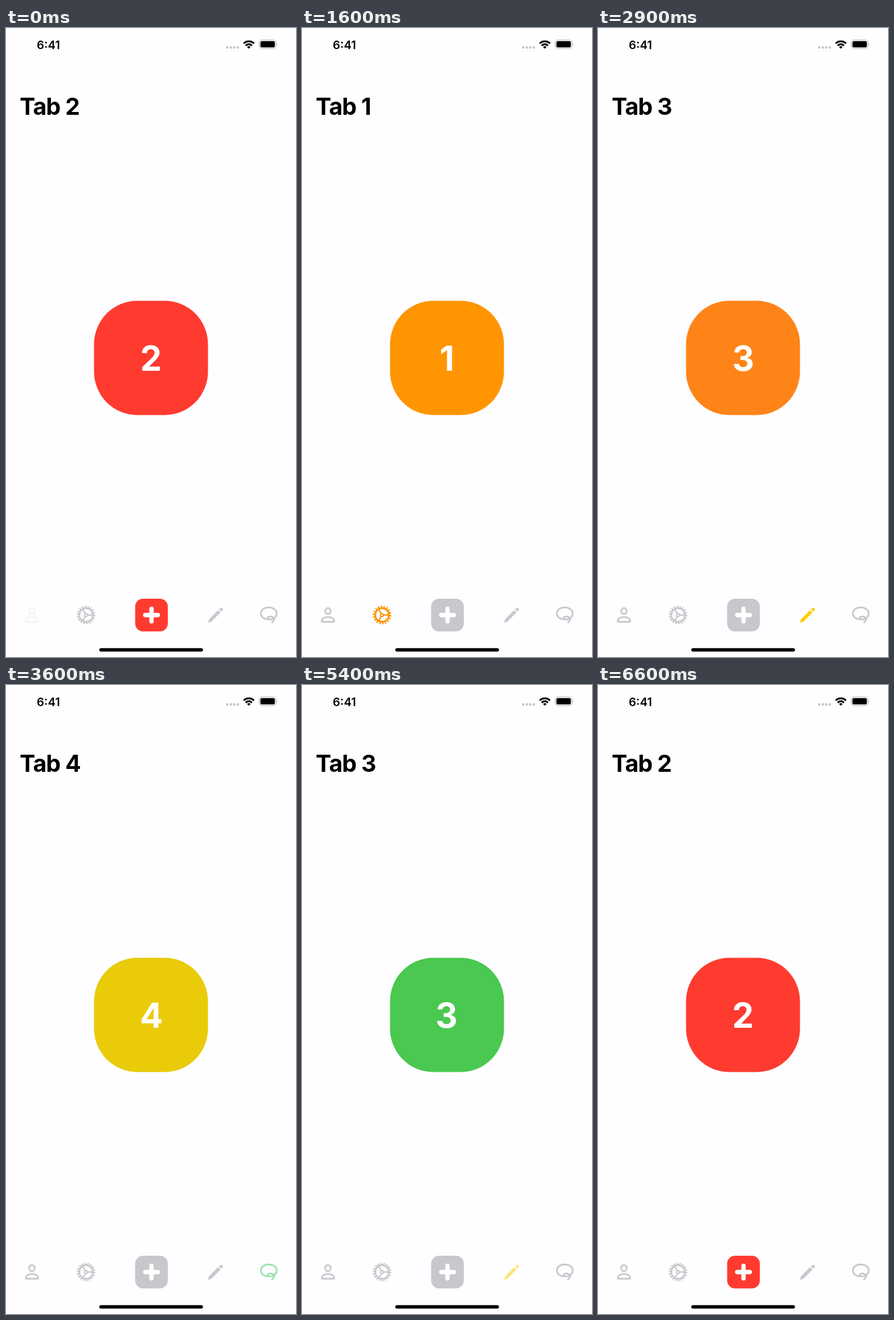
These frames come from a looping animation (509x1101 px, 6700 ms). An HTML page:

```html
<!DOCTYPE html>
<html lang="en">
<head>
<meta charset="utf-8">
<title>Tab bar</title>
<style>
  html, body { margin: 0; width: 100%; height: 100%; overflow: hidden; background: #fefdff; }
  svg { display: block; width: 100%; height: 100%; }
  text { font-family: Inter, sans-serif; }
  .line { fill: none; stroke: currentColor; stroke-width: 3; stroke-linecap: round; stroke-linejoin: round; }
  .tab { fill: currentColor; }
</style>
</head>
<body>
<svg viewBox="0 0 509 1101">
  <text x="54" y="36.5" font-size="20.3" font-weight="600">6:41</text>
  <path d="M388.2 34h.01M394.5 34h.01M400.7 34h.01M406.9 34h.01" stroke="#c8c7cb" stroke-width="4.4" stroke-linecap="round"/>
  <g fill="none" stroke="#000" stroke-width="3.2">
    <path d="M417.2 27.2a12.6 12.6 0 0 1 18 0M420.7 30.8a7.6 7.6 0 0 1 11 0"/>
    <path d="M426.2 36.2l-3-3a4.3 4.3 0 0 1 6 0z" fill="#000" stroke="none"/>
  </g>
  <rect x="444.5" y="21.1" width="29.4" height="15" rx="4.6" fill="none" stroke="#a5a4a8"/>
  <rect x="446.5" y="23.1" width="25.4" height="11" rx="2.8"/>
  <path d="M475.3 26.2q2 2.4 0 4.8z" fill="#a5a4a8"/>

  <text id="title" x="24" y="151.5" font-size="41" font-weight="700" letter-spacing="-.9"></text>

  <g id="card">
    <rect id="tile" x="-100" y="-100" width="200" height="200" rx="76"/>
    <text id="digit" y="22" font-size="60" font-weight="700" fill="#fff" text-anchor="middle"></text>
  </g>

  <g class="tab">
    <g class="line">
      <ellipse cx="45.6" cy="1020.8" rx="4.9" ry="5.3"/>
      <path d="M36 1039.3q-1.6 0-1.4-1.6c.8-4.4 5.6-6.7 11-6.7s10.200 2.300 11 6.700q.2 1.600-1.400 1.600z"/>
    </g>
  </g>
  <g class="tab">
    <g class="line" transform="translate(140.500 1027.500)">
      <circle r="12"/>
      <circle r="14.800" pathLength="36" stroke-dasharray="1 1" stroke-linecap="butt"/>
      <circle r="2.600" stroke-width="2"/>
      <path d="M3.300 0H11M-1.650 2.860L-5.500 9.500M-1.650-2.860L-5.500-9.500" stroke-width="2.400"/>
    </g>
  </g>
  <g class="tab">
    <rect x="226.700" y="999" width="57.300" height="57.300" rx="14"/>
    <path d="M244.300 1027.600h22.200M255.400 1016.500v22.200" stroke="#fff" stroke-width="7.600" stroke-linecap="round"/>
  </g>
  <g class="tab">
    <g transform="translate(354.500 1041) rotate(-45)">
      <path d="M.4 0L6-2.700H28V2.700H6z" stroke="currentColor" stroke-width=".6" stroke-linejoin="round"/>
      <path d="M30.400-2.700h2.800q2.200 0 2.200 2.200v1q0 2.200-2.200 2.200h-2.800z"/>
    </g>
  </g>
  <g class="tab">
    <path class="line" d="M459.500 1035C452 1034.500 447.500 1030.500 447.500 1025C447.500 1018.500 453.500 1014.200 461.200 1014.200S475 1018.500 475 1025C475 1030.500 471 1034.800 464.500 1035.200C461 1035.500 458.800 1034.500 459.300 1032.700C460 1030.500 463 1029.800 465.500 1030.300C469 1031 471 1033.200 470.300 1036Q469.500 1039 466.800 1040.500"/>
  </g>

  <rect x="163.700" y="1085.500" width="182" height="6" rx="3"/>
</svg>
<script>
const LOOP = 6700, STEP = 100, COLOR_MS = 420, FADE_MS = 220, PULSE_MS = 400;
const GRAY = '#c8c7cb';
const COLORS = [[0, 122, 255], [255, 149, 0], [255, 59, 48], [255, 204, 0], [52, 199, 89]];
// Each tap: finger down, finger up, tab index
const TAPS = [
  [-100, -100, 2], [0, 90, 0], [1060, 1060, 1], [2000, 2040, 2], [2690, 2690, 3],
  [3400, 3510, 4], [4395, 4395, 4], [5200, 5310, 3], [6100, 6140, 2],
];

const [title, card, tile, digit] = ['title', 'card', 'tile', 'digit'].map(id => document.getElementById(id));
const tabs = [...document.querySelectorAll('.tab')];
const rgb = c => `rgb(${c.map(Math.round)})`;
const clamp = x => Math.min(1, Math.max(0, x));
const ease = x => (1 - Math.cos(Math.PI * clamp(x))) / 2;

const widths = COLORS.map((_, i) => {
  digit.textContent = i;
  return digit.getComputedTextLength();
});

function draw(t) {
  const index = TAPS.findLastIndex(tap => tap[1] <= t);
  const [, up, tab] = TAPS[index];
  const from = index ? TAPS[index - 1][2] : tab;
  const next = TAPS[index + 1];
  const pressed = next && next[0] <= t ? next[2] : -1;
  const age = index ? t - up : LOOP;
  const p = ease(age / COLOR_MS);
  const pulse = from === tab ? Math.sin(Math.PI * clamp(age / PULSE_MS)) : 0;

  title.textContent = `Tab ${tab}`;
  digit.textContent = tab;
  digit.setAttribute('x', (widths[tab] - widths[from]) / 2 * (1 - p));
  digit.setAttribute('opacity', 1 - .3 * pulse);
  tile.setAttribute('fill', rgb(COLORS[tab].map((c, i) => COLORS[from][i] + (c - COLORS[from][i]) * p)));
  card.setAttribute('transform', `translate(254.5 577.5) scale(${1 + .145 * pulse})`);

  tabs.forEach((el, i) => {
    el.style.color = i === tab ? rgb(COLORS[i]) : GRAY;
    el.style.opacity = i === pressed ? .2 : i === tab ? .2 + .8 * ease(age / FADE_MS) : 1;
  });
}

function tick(now) {
  draw(Math.floor(now % LOOP / STEP) * STEP);
  requestAnimationFrame(tick);
}
tick(performance.now());
</script>
</body>
</html>
```
